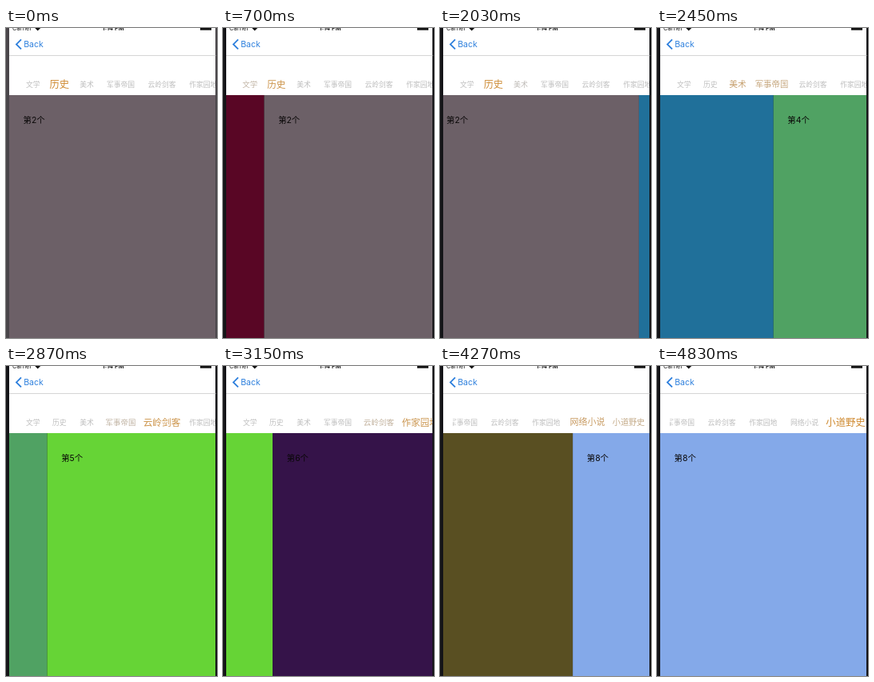
Animation of 264x388 px, one loop 5600 ms. Source, as an HTML page with a canvas:

```html
<!DOCTYPE html>
<html lang="zh-CN">
<head>
<meta charset="utf-8">
<title>Paged tabs</title>
<style>
  html, body { margin: 0; width: 100%; height: 100%; overflow: hidden; background: #fff; }
  canvas { display: block; width: 264px; height: 388px; }
</style>
</head>
<body>
<canvas id="stage"></canvas>
<script>
const W = 264, H = 388, LOOP = 5600;
const LEFT = 4, RIGHT = 262, PAGE_W = 258.4, PAGE_TOP = 84;
const LATIN = 'Inter, Roboto, sans-serif';
const CJK = '"Noto Sans CJK SC", "Noto Sans CJK", sans-serif';

const pageColors = ['#590625', '#6c6067', '#20709a', '#50a263',
                    '#66d436', '#351349', '#594f22', '#84a9e9'];
const tabs = [
  ['文学', 33.7], ['历史', 66.8], ['美术', 101], ['军事帝国', 143.5],
  ['云岭剑客', 195], ['作家园地', 246.8], ['网络小说', 298.5], ['小道野史', 350]
];
const TAB_GREY = [190, 190, 190], TAB_ORANGE = [207, 138, 48];

// Each swipe: start time, duration, direction
const swipes = [
  [610, 560, -1],
  [1600, 480, 1], [1997, 480, 1], [2297, 480, 1],
  [2597, 480, 1], [2894, 480, 1], [3191, 480, 1],
  [4109, 590, 1]
];

const canvas = document.getElementById('stage');
const ctx = canvas.getContext('2d');
const ratio = window.devicePixelRatio || 1;
canvas.width = W * ratio;
canvas.height = H * ratio;
ctx.scale(ratio, ratio);

const clamp = v => Math.max(0, Math.min(1, v));
const flick = t => 1 - (1 - clamp(t) ** 1.5) ** 3;
const smooth = t => { t = clamp(t); return t * t * (3 - 2 * t); };

function rect(x, y, w, h, color) {
  ctx.fillStyle = color;
  ctx.fillRect(x, y, w, h);
}

function text(str, x, y, font, color, align = 'left') {
  ctx.font = font;
  ctx.fillStyle = color;
  ctx.textAlign = align;
  ctx.fillText(str, x, y);
}

function clipped(x, y, w, h, draw) {
  ctx.save();
  ctx.beginPath();
  ctx.rect(x, y, w, h);
  ctx.clip();
  draw();
  ctx.restore();
}

function drawHeader() {
  text('Carrier', 8, 3.2, `7.4px ${LATIN}`, '#111');
  text('1:14 PM', 134, 3.2, `600 7.4px ${LATIN}`, '#111', 'center');
  rect(243, 0, 14, 2.7, '#111');

  ctx.fillStyle = '#111';
  ctx.beginPath();
  ctx.moveTo(39.7, 3.6);
  ctx.arc(39.7, 3.6, 5, -Math.PI * 0.75, -Math.PI * 0.25);
  ctx.fill();

  ctx.strokeStyle = '#2f80dd';
  ctx.lineWidth = 1.9;
  ctx.beginPath();
  ctx.moveTo(19, 14.4);
  ctx.lineTo(13, 20.4);
  ctx.lineTo(19, 26.4);
  ctx.stroke();
  text('Back', 22.2, 24.2, `10.5px ${LATIN}`, '#2f80dd');
  rect(LEFT, 34, PAGE_W, 1, '#d6d6d6');
}

function drawTabs(position, scroll) {
  tabs.forEach(([label, center], i) => {
    const focus = clamp(1 - Math.abs(position - i));
    const size = 8.8 * (1 + 0.4 * focus);
    const color = TAB_GREY.map((c, k) => Math.round(c + (TAB_ORANGE[k] - c) * focus));
    ctx.save();
    ctx.translate(center - scroll, 70.2);
    ctx.scale(size / 8.8, size / 8.8);
    text(label, 0, 8.8 * 0.38, `8.8px ${CJK}`, `rgb(${color})`, 'center');
    ctx.restore();
  });
}

function drawPages(position) {
  pageColors.forEach((color, i) => {
    const x = LEFT + (i - position) * PAGE_W;
    if (x >= RIGHT || x + PAGE_W <= LEFT) return;
    rect(x, PAGE_TOP, PAGE_W, H - PAGE_TOP, color);
    text(`第${i + 1}个`, x + 17.6, 119.4, `10.4px Inter, ${CJK}`, '#0a0808');
  });
}

function draw(t) {
  const position = swipes.reduce(
    (p, [start, duration, step]) => p + step * flick((t - start) / duration), 1);
  const scroll = 114 * smooth((t - 3680) / 310);

  rect(0, 0, W, H, t < 490 ? '#4a464a' : '#151518');
  rect(LEFT, 0, RIGHT - LEFT, PAGE_TOP, '#fff');
  drawHeader();
  clipped(16, 36, RIGHT - 16, 48, () => drawTabs(position, scroll));
  clipped(LEFT, PAGE_TOP, RIGHT - LEFT, H - PAGE_TOP, () => drawPages(position));
}

const begin = performance.now();
function frame() {
  draw((performance.now() - begin) % LOOP);
  requestAnimationFrame(frame);
}
frame();
</script>
</body>
</html>
```
